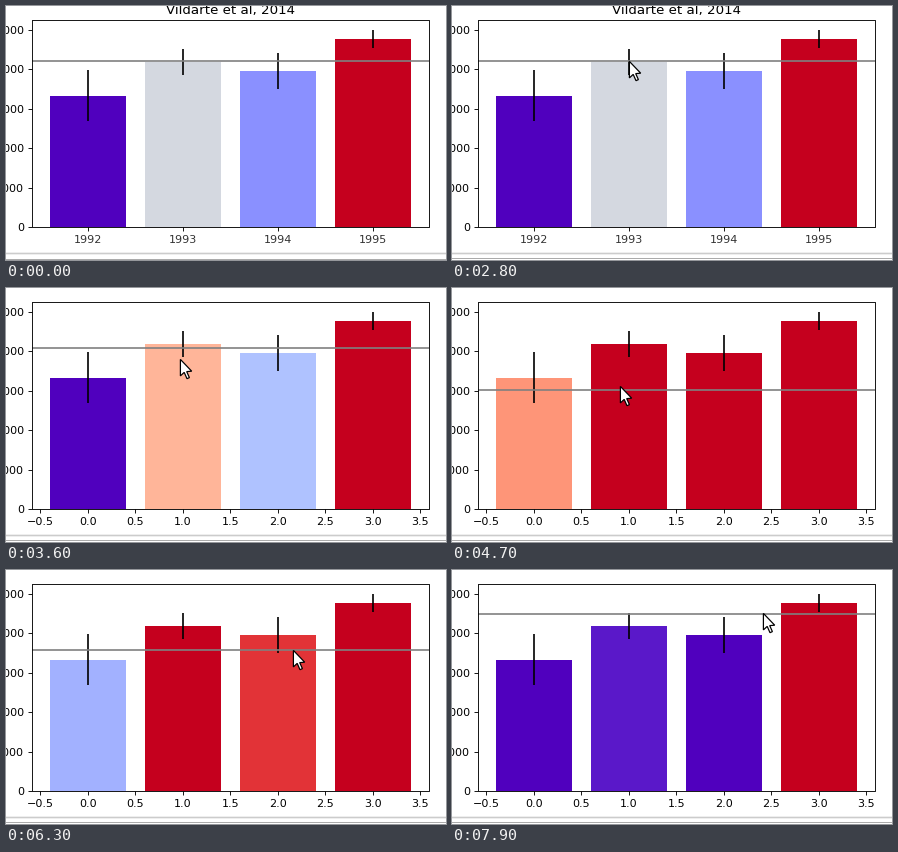
Animation of 440 by 254 pixels, one loop 8 s. Source, as a matplotlib script:

```python
import numpy as np
import matplotlib.pyplot as plt
from matplotlib.animation import FuncAnimation
from matplotlib.colors import LinearSegmentedColormap
from matplotlib.patches import Polygon, Rectangle

W, H, DPI = 440, 254, 80
FRAMES, STEP_MS = 80, 100
LEFT, RIGHT, TOP, BOTTOM = 25.9, 422.9, 14.3, 221.3
TICK, PAD = 3.9, 7.8
REDRAW_AT = 2.9                      # first click replaces labels and title
DRAGS = [(2.9, 5.5), (6.3, 6.5), (7.5, 8.0)]

plt.rcParams["font.family"] = "DejaVu Sans"
fig = plt.figure(figsize=(W / DPI, H / DPI), dpi=DPI, facecolor="white")
ax = fig.add_axes([0, 0, 1, 1])
ax.set(xlim=(0, W), ylim=(H, 0))
ax.axis("off")

# Bar colour by the line's place inside the bar's error interval, -1 to 1
SHADES = {-1: "#5000be", -0.56: "#8a90ff", -0.28: "#afc2ff", -0.08: "#d4d8e1",
          0.31: "#ffb598", 0.47: "#ff9a7b", 0.83: "#e33538", 1: "#c5001e"}
shade = LinearSegmentedColormap.from_list(
    "shade", [((z + 1) / 2, c) for z, c in SHADES.items()], N=512)

# Cursor moves in seconds: start, end, goal and, for curved ones, a bend point
ENTRY = (97, 74)
MOVES = [(1.0, 1.3, (136, 104)),
         (1.4, 2.3, (177, 54), (183, 94)),
         (3.4, 4.3, (167, 101), (162, 124)),
         (4.6, 5.5, (284, 84), (180, 40)),
         (5.5, 5.9, (287, 79)),
         (6.3, 6.5, (285, 76)),
         (6.6, 7.3, (318, 43), (248, 50)),
         (7.4, 7.9, (311, 42), (314, 46))]


def cursor_at(t):
    place = np.array(ENTRY, float)
    for start, end, goal, *bend in MOVES:
        goal = np.array(goal)
        middle = np.array(bend[0]) if bend else (place + goal) / 2
        s = np.clip((t - start) / (end - start), 0, 1)
        u = s * s * (3 - 2 * s)
        place = (1 - u)**2 * place + 2 * u * (1 - u) * middle + u**2 * goal
    return np.round(place)


def line_at(t):
    """The line trails the cursor by one step while dragged, then holds."""
    moments = [min(t, end) for start, end in DRAGS if t >= start]
    if not moments:
        return 55
    return cursor_at(moments[-1] - STEP_MS / 1000)[1] + 1


def stroke(xs, ys, color="black", width=0.8, z=4):
    return ax.plot(xs, ys, color=color, lw=width, zorder=z,
                   solid_capstyle="butt")[0]


def row(y, color):
    return ax.add_patch(Rectangle((0, y), W, 1, color=color, lw=0))


def slot(value):
    return LEFT + (value + 0.59) * (RIGHT - LEFT) / 4.18


def x_axis(values, labels, color):
    parts = []
    for x, label in zip(map(slot, values), labels):
        parts.append(stroke([x, x], [BOTTOM, BOTTOM + TICK]))
        parts.append(ax.text(x, BOTTOM + PAD, label, size=10, color=color,
                             ha="center", va="top"))
    return parts


TOPS, ERRORS = (89.6, 56, 65, 33), (25.4, 13, 18, 9)
bars = []
for i, (top, error) in enumerate(zip(TOPS, ERRORS)):
    x = slot(i)
    bars.append(ax.add_patch(Rectangle((x - 38, top), 76, BOTTOM - top, lw=0)))
    stroke([x, x], [top - error, top + error], width=1.5, z=2)
level = stroke([LEFT, RIGHT], [55, 55], "gray", 1.5, 3)

stroke([LEFT, RIGHT, RIGHT, LEFT, LEFT], [TOP, TOP, BOTTOM, BOTTOM, TOP])
for k in range(6):
    y = BOTTOM - 39.5 * k
    stroke([LEFT - TICK, LEFT], [y, y])
    ax.text(LEFT - PAD, y, str(10000 * k), size=10, ha="right",
            va="center_baseline")

years = x_axis(range(4), range(1992, 1996), "#333333")
years.append(ax.text((LEFT + RIGHT) / 2, TOP - 6.7, "Vildarte et al, 2014",
                     size=12, ha="center", va="baseline"))
halves = np.arange(-0.5, 3.6, 0.5)
numbers = x_axis(halves, [f"{v:.1f}".replace("-", "\u2212") for v in halves],
                 "black")

for offset in (-1, 0, 1):
    row(247 + offset, "#eeeeee" if offset else "#cccccc")
edge = row(253, "#ababab")

ARROW = np.array([(0, 0), (0, 16.5), (3.8, 13), (6.6, 19.3), (9, 18.2),
                  (6.3, 12.2), (11.3, 11.8)]) + (0.4, 1.4)
arrow = ax.add_patch(Polygon(ARROW, fc="white", ec="black", lw=1.1,
                             joinstyle="miter", zorder=10))


def update(frame):
    t = frame * STEP_MS / 1000 + 1e-6
    y = line_at(t)
    level.set_ydata([y, y])
    for bar, top, error in zip(bars, TOPS, ERRORS):
        bar.set_facecolor(shade(((y - top) / error + 1) / 2))
    redrawn = t >= REDRAW_AT
    for part in years:
        part.set_visible(not redrawn)
    for part in numbers:
        part.set_visible(redrawn)
    edge.set_y(252 if t >= 2.4 else 253)
    arrow.set_visible(t >= 1)
    arrow.set_xy(ARROW + cursor_at(t))
    return []


animation = FuncAnimation(fig, update, frames=FRAMES, interval=STEP_MS,
                          init_func=lambda: update(0), repeat=True,
                          repeat_delay=0)
plt.show()
```
